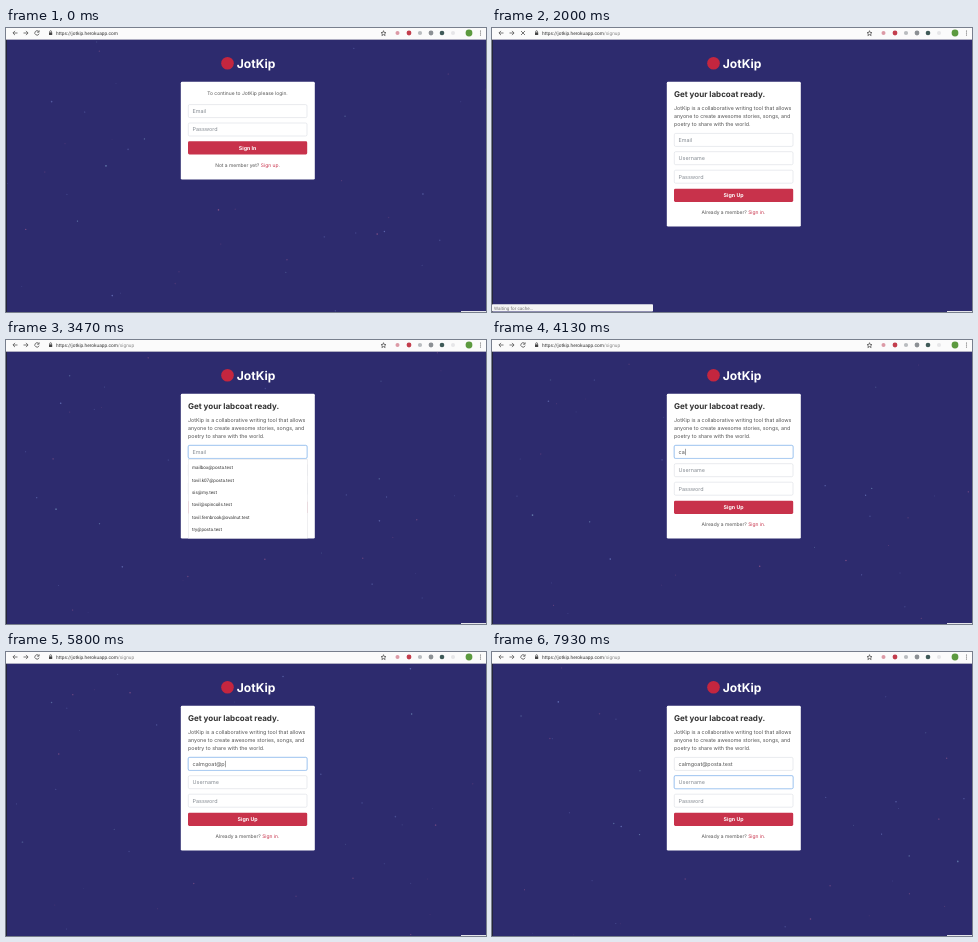
Animation of 480x284 px, one loop 8 s. Source, as an HTML page:

```html
<!DOCTYPE html>
<html lang="en">
<head>
<meta charset="utf-8">
<title>Sign up</title>
<style>
  html, body { margin: 0; width: 100%; height: 100%; overflow: hidden; background: #2d2b6e; }
  svg { display: block; width: 100vw; height: 100vh; }
  text { font-family: Inter, sans-serif; font-size: 5.3px; fill: #555; text-rendering: geometricPrecision; white-space: pre; }
  .mid { text-anchor: middle; }
  .bold { font-weight: 700; }
  .small { font-size: 4.95px; }
  .link { fill: #c8324b; }
  .hint { fill: #858b92; font-size: 5.4px; }
  .ui { font-family: Roboto, sans-serif; font-size: 4.8px; fill: #333; }
  .field { fill: #fff; stroke: #d3d7dc; stroke-width: .5; }
  .icon { fill: none; stroke: #555; stroke-width: .8; }
</style>
</head>
<body>
<svg id="stage" viewBox="0 0 480 284" preserveAspectRatio="none"></svg>
<script>
const LOOP = 8000;
const SIGNUP_AT = 1670, LOADED_AT = 2250;
const FOCUS_AT = 2900, LIST_AT = 3150, TYPE_AT = 3900, KEY_MS = 200, NEXT_FIELD_AT = 7700;
const BRAND = 'JotKip';
const ADDRESS = 'calmgoat@posta.test';
const SUGGESTIONS = ['mailbox@posta.test', 'tovil.k07@posta.test', 'sis@my.test',
  'tovil@spincoils.test', 'tovil.fernbrook@ovalnut.test', 'try@posta.test'];

const stage = document.getElementById('stage');

function add(parent, tag, attrs = {}, content = '') {
  const node = document.createElementNS('http://www.w3.org/2000/svg', tag);
  for (const key in attrs) node.setAttribute(key, attrs[key]);
  node.textContent = content;
  parent.append(node);
  return node;
}
const group = (parent = stage) => add(parent, 'g');
const rect = (parent, x, y, width, height, attrs) =>
  add(parent, 'rect', { x, y, width, height, ...attrs });
const circle = (parent, cx, cy, r, fill) => add(parent, 'circle', { cx, cy, r, fill });
const label = (parent, x, y, content, cls = '') => add(parent, 'text', { x, y, class: cls }, content);
const icon = (parent, d, attrs) => add(parent, 'path', { d, class: 'icon', ...attrs });
const show = (node, on) => node.setAttribute('visibility', on ? 'inherit' : 'hidden');

function randomizer(seed) {
  return () => (seed = (seed * 16807) % 2147483647) / 2147483647;
}

// Page background with drifting specks
rect(stage, 0, 0, 480, 284, { fill: '#2d2b6e' });
const specks = group();
const random = randomizer(4211);
const particles = Array.from({ length: 46 }, () => ({
  x: random() * 480, y: random() * 272,
  vx: (random() - .5) * 30, vy: (random() - .5) * 30,
  phase: random() * 6.28,
  node: circle(specks, 0, 0, .4 + random() * .45, ['#8294dc', '#b96a98', '#8ab4d6'][Math.floor(random() * 3)])
}));
const wrap = (value, size) => ((value % size) + size) % size;

function moveSpecks(t) {
  for (const p of particles) {
    p.node.setAttribute('cx', wrap(p.x + p.vx * t / 1000, 480));
    p.node.setAttribute('cy', 12 + wrap(p.y + p.vy * t / 1000, 272));
    p.node.setAttribute('opacity', .38 + .2 * Math.sin(p.phase + t / 700));
  }
}
rect(stage, 0, 11, 1, 273, { fill: '#25263a' });
rect(stage, 455, 283, 25, 1, { fill: '#e4e4ea' });

// Browser bar
const bar = group();
rect(bar, 0, 0, 480, 11.5, { fill: '#fbfbfb' });
rect(bar, 0, 11, 480, .5, { fill: '#c9c9cf' });
icon(bar, 'M11.5 5H7M9 2.9L6.9 5L9 7.1');
icon(bar, 'M17.5 5H22M20 2.9L22.1 5L20 7.1', { stroke: '#aaa' });
const reload = icon(bar, 'M32.7 3.5A2.2 2.2 0 1 0 33.1 5.7M33.1 2.3V4.2H31.1');
const stop = icon(bar, 'M29 3L33 7M33 3L29 7');
rect(bar, 43, 4.4, 3.2, 2.6, { fill: '#444' });
icon(bar, 'M43.7 4.6V3.6A.9 .9 0 0 1 45.5 3.6V4.6', { 'stroke-width': .6 });
const url = label(bar, 50, 6.8, `https://${BRAND.toLowerCase()}.herokuapp.com`, 'ui');
const path = add(url, 'tspan', { fill: '#888' });
icon(bar, 'M377.5 2.7L378.2 4.5L380 4.6L378.6 5.8L379.1 7.6L377.5 6.6L375.9 7.6L376.4 5.8L375 4.6L376.8 4.5Z', { 'stroke-width': .5 });
[[391.5, 2, '#dc9aa6'], [403, 2.4, '#c33e4d'], [414, 2.1, '#b9bcbf'], [425, 2.4, '#8c9094'],
 [436, 2.3, '#3f5a58'], [447, 2, '#e6e6e8'], [463, 3.4, '#5c9a3f']]
  .forEach(([x, r, color]) => circle(bar, x, 5, r, color));
[3, 5, 7].forEach(y => circle(bar, 474.5, y, .55, '#555'));

// Heading above the card
circle(stage, 221.5, 35.3, 6.3, '#c4263f');
add(stage, 'text', { x: 230.8, y: 39.7, class: 'bold', style: 'font-size:12.1px;fill:#fff' }, BRAND);

function card(height) {
  const g = group();
  rect(g, 174.8, 53.8, 134, height, { rx: 1.4, fill: '#fff' });
  return g;
}
function field(parent, y, hint) {
  const g = group(parent);
  const halo = rect(g, 181.6, y - .6, 120, 14.2, { rx: 2, fill: '#c5dcf6' });
  const box = rect(g, 182.3, y, 118.7, 13, { rx: 1.4, class: 'field' });
  const text = label(g, 186.6, y + 8.4, hint, 'hint');
  show(halo, false);
  return {
    focus(on) {
      show(halo, on);
      box.style.stroke = on ? '#6ea6e6' : '';
    },
    text
  };
}
function button(parent, y, caption) {
  rect(parent, 182, y, 119.2, 13.2, { rx: 1.4, fill: '#c8324b' });
  label(parent, 241.6, y + 8.5, caption, 'mid bold').style.fill = '#fff';
}
function footer(parent, y, question, action) {
  const line = label(parent, 241.5, y, question + ' ', 'mid small');
  add(line, 'tspan', { class: 'link' }, action);
  add(line, 'tspan', {}, '.');
}

// Login card
const login = card(97.8);
label(login, 241.5, 66.9, `To continue to ${BRAND} please login.`, 'mid small');
field(login, 76.6, 'Email');
field(login, 95, 'Password');
button(login, 113.3, 'Sign In');
footer(login, 139.3, 'Not a member yet?', 'Sign up');

// Sign-up card
const signup = card(144.8);
const title = label(signup, 182, 68.7, 'Get your labcoat ready.', 'bold');
title.style.cssText = 'font-size:8px;fill:#333';
[`${BRAND} is a collaborative writing tool that allows`,
 'anyone to create awesome stories, songs, and',
 'poetry to share with the world.'].forEach((line, i) => label(signup, 182, 81.9 + i * 8, line));
const email = field(signup, 105.4, 'Email');
const username = field(signup, 123.7, 'Username');
field(signup, 142.2, 'Password');
button(signup, 160.7, 'Sign Up');
footer(signup, 186.3, 'Already a member?', 'Sign in');
const caret = rect(signup, 0, 108.8, .5, 6.4, { fill: '#444' });

const list = group(signup);
rect(list, 182.2, 119.2, 119, 79, { fill: '#fff', stroke: '#d8d8dc', 'stroke-width': .4 });
SUGGESTIONS.forEach((item, i) => {
  label(list, 186, 129.2 + i * 12.35, item, 'ui').style.fontSize = '4.6px';
});

// Loading status
const status = group();
rect(status, 0, 276.3, 161, 7.2, { rx: .8, fill: '#f4f4f5' });
label(status, 2, 281.6, 'Waiting for cache…', 'ui').style.cssText = 'font-size:4.6px;fill:#777';

function render(t) {
  const registering = t >= SIGNUP_AT;
  const loading = registering && t < LOADED_AT;
  show(login, !registering);
  show(signup, registering);
  show(status, loading);
  show(stop, loading);
  show(reload, !loading);
  show(specks, !loading);
  path.textContent = registering ? '/signup' : '';
  moveSpecks(t);

  const typed = t < TYPE_AT ? 0 : Math.min(ADDRESS.length, 1 + Math.floor((t - TYPE_AT) / KEY_MS));
  const emailFocused = registering && t >= FOCUS_AT && t < NEXT_FIELD_AT;
  email.text.textContent = typed ? ADDRESS.slice(0, typed) : 'Email';
  email.text.style.fill = typed ? '#555' : '';
  email.focus(emailFocused);
  username.focus(t >= NEXT_FIELD_AT);
  show(list, t >= LIST_AT && t < TYPE_AT);
  show(caret, emailFocused && typed > 0);
  if (typed) caret.setAttribute('x', 186.9 + email.text.getComputedTextLength());
}

function frame() {
  render(performance.now() % LOOP);
  requestAnimationFrame(frame);
}
frame();
</script>
</body>
</html>
```
